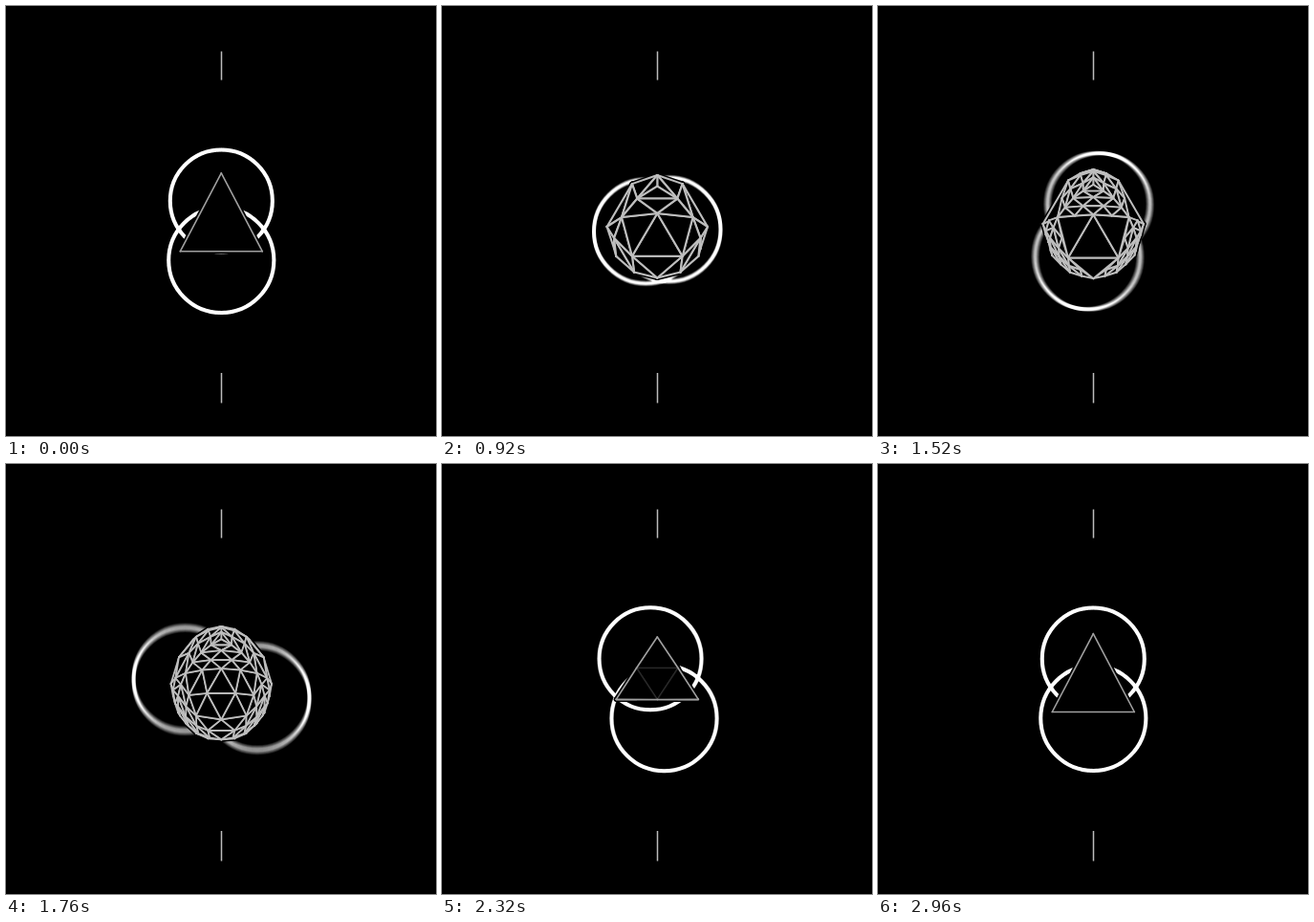
Recreate the animation shown at these times as an HTML page with a canvas. Size 450 px wide and 450 px high, loop 3 s.

```html
<!DOCTYPE html>
<html lang="en">
<head>
<meta charset="utf-8">
<title>Rings and solid</title>
<style>
html, body { margin: 0; width: 100%; height: 100%; overflow: hidden; background: #000; }
canvas { display: block; width: 450px; height: 450px; }
</style>
</head>
<body>
<canvas id="stage" width="450" height="450"></canvas>
<script>
const ctx = document.getElementById('stage').getContext('2d');
const LOOP = 3000, STEP = 40, SHUTTER = 25, SAMPLES = 17;
const CX = 225.3, RING_Y = 235, R = 52.7;
const RAD = Math.PI / 180;

// time, clockwise turn, distance of each ring from the centre
const ORBIT = [
  [0, 0, 31], [520, 102, 51], [920, 265, 12], [1240, 415, 36],
  [1520, 552, 28], [2000, 736, 50], [2320, 887, 32], [3000, 900, 31]
];

// time, tilt, centre y, vertical stretch
const POSE = [
  [0, 70, 229.3, 1.1], [520, 36, 227.5, 1.08], [920, 50, 231, 1.05], [1520, 45, 228, 1.1],
  [2000, 62, 232, 1.18], [2320, 90, 230, .93], [2960, 70, 232, 1.1], [3000, 70, 229.3, 1.1]
];

function smooth(t, from, to) {
  const u = Math.min(1, Math.max(0, (t - from) / (to - from)));
  return u * u * (3 - 2 * u);
}

// Smooth curve through the key points, without overshoot
function follow(keys, t) {
  let i = 0;
  while (i < keys.length - 2 && t >= keys[i + 1][0]) i++;
  const a = keys[i], b = keys[i + 1], dt = b[0] - a[0];
  const u = (t - a[0]) / dt, u2 = u * u, u3 = u2 * u;
  const slope = (n, k) => n < 0 || n > keys.length - 2 ? 0
    : (keys[n + 1][k] - keys[n][k]) / (keys[n + 1][0] - keys[n][0]);
  const tangent = (n, k) => {
    const p = slope(n - 1, k), q = slope(n, k);
    return p * q > 0 ? 2 * p * q / (p + q) * dt : 0;
  };
  return a.slice(1).map((v, n) => {
    const k = n + 1;
    return v + (b[k] - v) * (3 * u2 - 2 * u3)
      + tangent(i, k) * (u3 - 2 * u2 + u) + tangent(i + 1, k) * (u3 - u2);
  });
}

function line(x1, y1, x2, y2) {
  ctx.beginPath();
  ctx.moveTo(x1, y1);
  ctx.lineTo(x2, y2);
  ctx.stroke();
}

function ring(x, y) {
  ctx.beginPath();
  ctx.arc(CX + x, RING_Y + y, 54.3 + y * .025, 0, 7);
  ctx.stroke();
}

// Both rings, averaged over the open shutter
function drawRings(t) {
  ctx.globalCompositeOperation = 'lighter';
  ctx.strokeStyle = '#fff';
  ctx.lineWidth = 4;
  ctx.globalAlpha = 1 / SAMPLES;
  for (let i = 0; i < SAMPLES; i++) {
    const at = t + SHUTTER * (i / (SAMPLES - 1) - .5);
    const [turn, dist] = follow(ORBIT, Math.min(LOOP, Math.max(0, at)));
    const x = dist * Math.sin(turn * RAD), y = -dist * Math.cos(turn * RAD);
    ring(x, y);
    ring(-x, -y);
  }
  ctx.globalAlpha = 1;
  ctx.globalCompositeOperation = 'source-over';
}

function corners(tilt) {
  const point = (id, x, r, deg) =>
    ({ id, p: [x, r * Math.sin(deg * RAD), r * Math.cos(deg * RAD)] });
  const half = R * Math.sqrt(2 / 3), base = R / Math.sqrt(3);
  return [
    point('t', 0, R, tilt),
    point('l', -half, base, tilt - 125.26),
    point('r', half, base, tilt - 125.26),
    point('b', 0, R, tilt + 109.47)
  ];
}

// Splits every face in four; new points swell towards the sphere
function buildFaces(tilt, bulge, baseBulge) {
  const [c, l, r, d] = corners(tilt);
  let faces = [[c, l, r], [c, r, d], [c, d, l], [l, d, r]]
    .map(v => ({ v, e: [0, 0, 0], inner: false }));
  bulge.forEach((g, n) => {
    if (g <= 0) return;
    const level = n + 1, cache = new Map();
    const mid = (a, b) => {
      const id = a.id < b.id ? `(${a.id}${b.id})` : `(${b.id}${a.id})`;
      if (!cache.has(id)) {
        const m = a.p.map((v, k) => (v + b.p[k]) / 2);
        const s = 1 + (R / Math.hypot(...m) - 1) * (id === '(lr)' ? baseBulge : g);
        cache.set(id, { id, p: m.map(v => v * s) });
      }
      return cache.get(id);
    };
    faces = faces.flatMap(f => {
      // The middle of each side is the last to split
      if (level === 3 && f.inner && g < .6) return [f];
      const [a, b, c] = f.v, [ab, bc, ca] = f.e, inner = f.inner;
      const x = mid(a, b), y = mid(b, c), z = mid(c, a);
      return [
        { v: [a, x, z], e: [ab, level, ca], inner },
        { v: [x, b, y], e: [ab, bc, level], inner },
        { v: [z, y, c], e: [level, bc, ca], inner },
        { v: [x, y, z], e: [level, level, level], inner: inner || level === 1 }
      ];
    });
  });
  return faces;
}

function trace(pts) {
  ctx.beginPath();
  pts.forEach(p => ctx.lineTo(...p));
  ctx.closePath();
}

function drawSolid(t) {
  const [tilt, cy, stretch] = follow(POSE, t);
  const grow = (from, to, level) =>
    smooth(t, from, to) * (1 - smooth(t, 2060, 2400 - 60 * level));
  const bulge = [grow(0, 500, 1), grow(540, 920, 2), grow(1180, 2000, 3)];
  const alpha = [1, ...bulge.map(g => Math.min(1, g * 12))];
  const shown = buildFaces(tilt, bulge, grow(360, 800, 1)).map(f => ({
    e: f.e,
    pts: f.v.map(({ p }) => [CX + p[0], cy - p[1] * stretch]),
    depth: f.v.reduce((sum, { p }) => sum + p[2], 0)
  })).filter(({ pts: [a, b, c] }) =>
    (b[0] - a[0]) * (c[1] - a[1]) - (b[1] - a[1]) * (c[0] - a[0]) < -.5
  ).sort((a, b) => a.depth - b.depth);

  ctx.lineCap = ctx.lineJoin = 'round';
  ctx.fillStyle = ctx.strokeStyle = '#000';
  ctx.lineWidth = 5;
  for (const { pts } of shown) {
    trace(pts);
    ctx.stroke();
  }

  const tone = 160 + 30 * bulge[0];
  ctx.strokeStyle = `rgb(${tone},${tone},${tone})`;
  ctx.lineWidth = 1.6 + .5 * bulge[0] - .4 * bulge[2];
  for (const { pts, e } of shown) {
    trace(pts);
    ctx.fill();
    pts.forEach((p, k) => {
      ctx.globalAlpha = alpha[e[k]];
      line(...p, ...pts[(k + 1) % 3]);
    });
    ctx.globalAlpha = 1;
  }
}

function drawMarks() {
  ctx.lineCap = 'butt';
  ctx.strokeStyle = '#bcbcbc';
  ctx.lineWidth = 1.5;
  line(225.5, 47.5, 225.5, 77.5);
  line(225.5, 384, 225.5, 415.5);
}

function draw(t) {
  ctx.fillStyle = '#000';
  ctx.fillRect(0, 0, 450, 450);
  drawRings(t);
  drawSolid(t);
  drawMarks();
}

const start = performance.now();
function tick() {
  const t = (performance.now() - start) % LOOP;
  draw(Math.floor(t / STEP) * STEP);
  requestAnimationFrame(tick);
}
tick();
</script>
</body>
</html>
```
